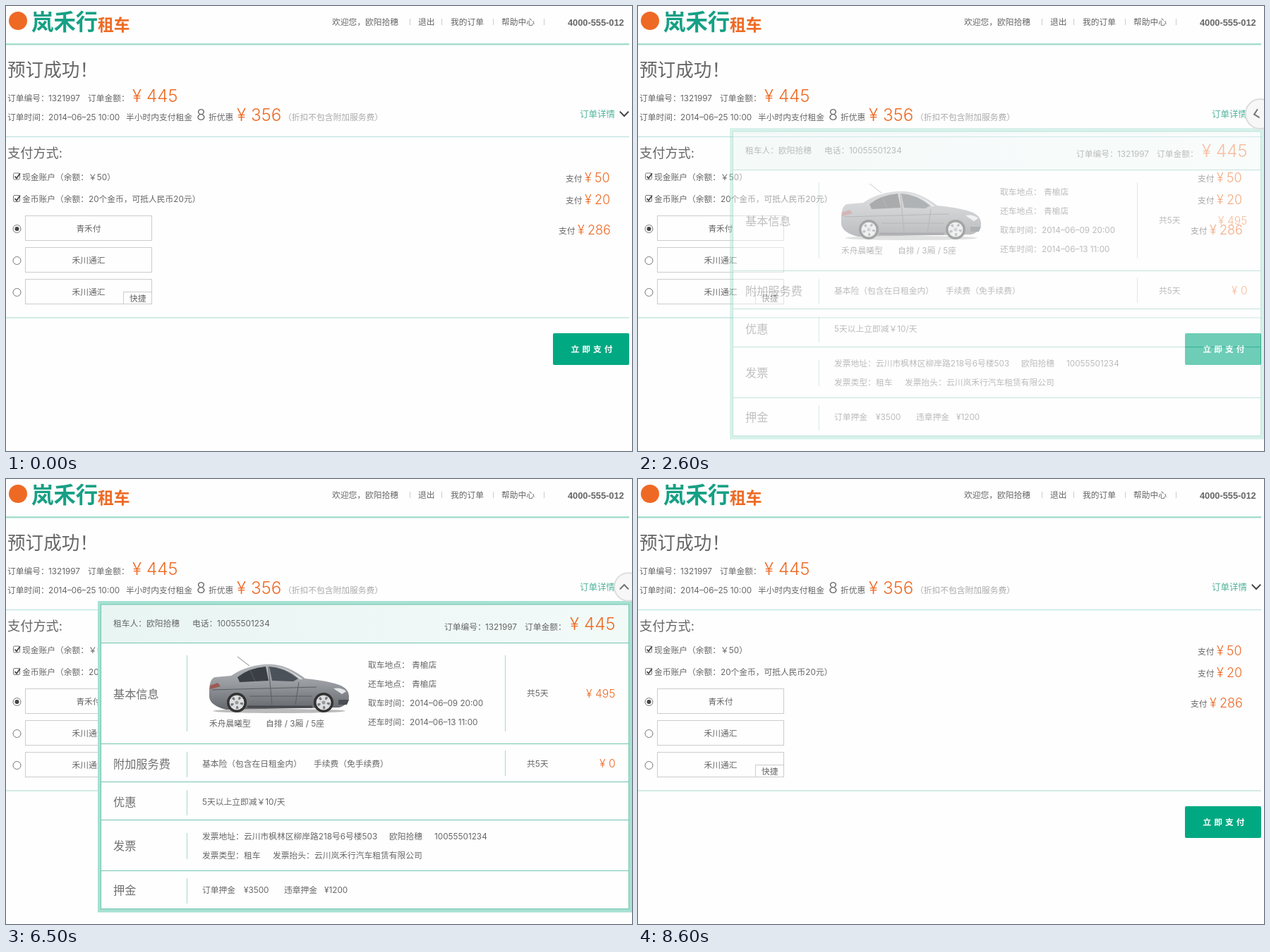
These frames come from a looping animation (887 by 631 pixels, 8620 ms). An HTML page:

```html
<!DOCTYPE html>
<html lang="zh-CN">
<head>
<meta charset="utf-8">
<title>预订成功</title>
<style>
html, body { margin: 0; width: 100%; height: 100%; overflow: hidden; background: #fefefe; }
svg { display: block; }
text { font-family: Inter, "Noto Sans CJK SC", "Noto Sans CJK", "Noto Sans CJK JP", sans-serif; white-space: pre; }
</style>
</head>
<body>
<svg id="stage" width="887" height="631" viewBox="0 0 887 631"></svg>
<script>
const LOOP = 8620, GREY = '#666', ORANGE = '#ee6a24', GREEN = '#00a982';
const USER = '欧阳拾穗', MOBILE = '10055501234', STORE = '青榆店';

// y is the visual centre of the glyphs
const text = (x, y, s, size = 11.75, fill = GREY, attrs = '') =>
  `<text x="${x}" y="${y + size * .38}" font-size="${size}" fill="${fill}" ${attrs}>${s}</text>`;
const price = (x, y, s, size, gap) =>
  text(x, y, '¥', size, ORANGE, 'font-weight="300"') +
  text(x + gap, y, s, size, ORANGE, 'font-weight="300"');
const rect = (x, y, w, h, attrs) => `<rect x="${x}" y="${y}" width="${w}" height="${h}" ${attrs}/>`;
const hline = (x, y, w, fill, h = 1) => rect(x, y, w, h, `fill="${fill}"`);
const vline = (x, y, h, fill) => rect(x, y, 1, h, `fill="${fill}"`);
const circle = (x, y, r, attrs) => `<circle cx="${x}" cy="${y}" r="${r}" ${attrs}/>`;

const checkbox = y =>
  rect(10.5, y - 4.5, 9, 9, 'rx="1.5" fill="#fff" stroke="#777"') +
  `<path d="M12.5 ${y}l2.5 2.8 5-7" fill="none" stroke="#444" stroke-width="1.7"/>`;

const option = (y, label, on) =>
  circle(15.5, y, 5.5, 'fill="#fff" stroke="#777"') +
  (on ? circle(15.5, y, 3, 'fill="#444"') : '') +
  rect(27.5, y - 18.5, 179, 35, 'fill="none" stroke="#ccc"') +
  text(117, y, label, 11.75, GREY, 'text-anchor="middle"');

const payment = (x, y, amount) => text(x, y + 1.5, '支付') + price(x + 27, y, amount, 18, 14);

const header =
  circle(17, 21, 13, `fill="${ORANGE}"`) +
  text(36, 22, '岚禾行', 31.4, '#16a085', 'font-weight="900"') +
  text(130, 26, '租车', 22.7, ORANGE, 'font-weight="900"') +
  text(462, 23, '欢迎您，' + USER) + text(584, 23, '退出') +
  text(630, 23, '我的订单') + text(702, 23, '帮助中心') +
  [572, 617, 690, 762].map(x => vline(x, 18, 9, '#ccc')).join('') +
  text(796, 23.3, '4000-555-012', 12.8, GREY,
    'font-weight="bold" style="font-family:\'Liberation Sans\',sans-serif"') +
  hline(0, 53, 883, '#a3dccd', 2.4);

const order =
  text(2, 90.5, '预订成功！', 25.6, GREY, 'font-weight="300"') +
  text(2, 131, '订单编号：') + text(60, 131, '1321997') + text(116, 131, '订单金额：') +
  price(179, 126.5, '445', 24.2, 20) +
  text(2, 158, '订单时间：') + text(60, 158, '2014–06–25 10:00') +
  text(170, 158, '半小时内支付租金') + text(270, 154.5, '8', 21, GREY, 'font-weight="300"') +
  text(287, 158, '折优惠') +
  price(327, 153.5, '356', 24.2, 20) +
  text(393, 158, '（折扣不包含附加服务费）', 11.75, '#aaa') +
  text(813, 153.5, '订单详情', 12.5, '#4fb39b') +
  hline(0, 185, 883, '#b4dedc');

const payWays =
  text(2, 208, '支付方式:', 18.2) +
  checkbox(241.5) + text(23, 243, '现金账户（余额：￥50）') +
  checkbox(273) + text(23, 274, '金币账户（余额：20个金币，可抵人民币20元）') +
  payment(793, 243, '50') + payment(793, 274, '20') + payment(783, 317.5, '286') +
  option(316, '青禾付', true) + option(361, '禾川通汇') + option(406, '禾川通汇') +
  rect(166.5, 405.5, 40, 17, 'fill="#fefefe" stroke="#ccc"') + text(175, 415, '快捷') +
  hline(0, 441.5, 883, '#a8dccb') +
  rect(775, 464, 108, 45, `rx="2" fill="${GREEN}"`) +
  text(800.5, 487, '立即支付', 11.75, '#fff', 'font-weight="bold" letter-spacing="4"');

const wheel = x =>
  circle(x, 317, 14, 'fill="#333"') + circle(x, 317, 10.5, 'fill="#dcdee0"') +
  circle(x, 317, 7, 'fill="none" stroke="#77797c" stroke-width="4" stroke-dasharray="3 5.8"') +
  circle(x, 317, 2.5, 'fill="#999"');

const car =
  `<ellipse cx="387" cy="329" rx="94" ry="3" fill="#bbb"/>
  <path d="M328 252l17 13" stroke="#888"/>
  <path d="M288 298Q289 283 296 281L319 279Q342 263 374 262.5Q398 263 424 283Q456 286 472 292Q486 297 486 309Q486 320 472 324L312 327Q288 321 288 308Z" fill="url(#paint)"/>
  <path d="M328 281Q344 268 368 266L372 286L331 288Z" fill="#3a3f45"/>
  <path d="M373 266Q394 267 414 283L407 287L377 286Z" fill="#4b5259"/>
  <path d="M382 266Q398 267 421 284L416 284Q400 269 382 266Z" fill="#d5d8da"/>
  <path d="M346 271l7 16M372 266l5 55M415 288l-5 32M292 299L440 295M345 308L434 308" fill="none" stroke="#5a5d62"/>
  <path d="M342 323H434" stroke="#44474b" stroke-width="3"/>
  <path d="M289 293l11-4 4 5-15 4Z" fill="#9d5a54"/>
  <path d="M464 297q11-2 18 4l-6 4Z" fill="#e4e7e9"/>
  <path d="M471 313h15l-3 7h-12Z" fill="#4a4d51"/>` + wheel(327) + wheel(450);

const LINE = '#74c4b0', SOFT = '#a5d9cc';
const panel =
  rect(132.5, 175.5, 752, 436.5, 'fill="#fefefe" stroke="#a6e1d2" stroke-width="5"') +
  rect(135, 178, 747.5, 54, 'fill="url(#bar)"') +
  rect(134.5, 178, 748, 431.5, `fill="none" stroke="${LINE}"`) +
  [232, 375, 429, 483, 555].map(y => hline(135, y, 747, LINE)).join('') +
  [[250, 108], [387, 36], [441, 36], [502, 37], [566, 36]].map(([y, h]) => vline(256, y, h, SOFT)).join('') +
  vline(707, 250, 108, SOFT) + vline(707, 385, 36, SOFT) +
  text(152, 205, '租车人：') + text(199, 205, USER) + text(264, 205, '电话：') + text(299, 205, MOBILE) +
  text(621, 210, '订单编号：') + text(679, 210, '1321997') + text(735, 210, '订单金额：') +
  price(799, 205, '445', 24.2, 20) +
  [['基本信息', 305], ['附加服务费', 404], ['优惠', 458], ['发票', 520], ['押金', 583]]
    .map(([s, y]) => text(152, y, s, 16.2, '#707070')).join('') +
  car +
  text(288, 347, '禾舟晨曦型') + text(368, 347, '自排 / 3厢 / 5座') +
  text(513, 264, '取车地点：') + text(575, 264, STORE) +
  text(513, 291, '还车地点：') + text(575, 291, STORE) +
  text(513, 318, '取车时间：') + text(572, 318, '2014–06–09 20:00') +
  text(513, 345, '还车时间：') + text(572, 345, '2014–06–13 11:00') +
  text(738, 304, '共5天') + price(822, 304, '495', 15.6, 13) +
  text(278, 404, '基本险（包含在日租金内）') + text(436, 404, '手续费（免手续费）') +
  text(738, 404, '共5天') + price(841, 403, '0', 15.6, 13) +
  text(278, 458, '5天以上立即减￥10/天') +
  text(278, 507, '发票地址：') + text(337, 507, '云川市枫林区柳岸路218号6号楼503') +
  text(543, 507, USER) + text(607, 507, MOBILE) +
  text(278, 534, '发票类型：') + text(337, 534, '租车') +
  text(378, 534, '发票抬头：') + text(437, 534, '云川岚禾行汽车租赁有限公司') +
  text(278, 583, '订单押金') + text(337, 583, '¥3500') +
  text(394, 583, '违章押金') + text(451, 583, '¥1200');

const $ = id => document.getElementById(id);
$('stage').innerHTML = `
  <defs>
    <linearGradient id="paint" x2="0" y2="1">
      <stop stop-color="#b4b7ba"/><stop offset=".45" stop-color="#96999e"/><stop offset="1" stop-color="#64676c"/>
    </linearGradient>
    <linearGradient id="bar"><stop stop-color="#e9f5f2"/><stop offset="1" stop-color="#f2faf8"/></linearGradient>
  </defs>
  ${header}${order}${payWays}
  <g id="panel">${panel}</g>
  <g id="halo">${circle(0, 0, 21, 'fill="#f7f7f7" stroke="#dcdcdc" stroke-width="2"')}</g>
  <path id="arrow" d="M-6.2 -3.4L0 3L6.2 -3.4" fill="none" stroke-width="2"/>`;

const ramp = (t, start, length) => {
  const u = Math.min(1, Math.max(0, (t - start) / length));
  return u * u * (3 - 2 * u);
};

function draw() {
  const t = performance.now() % LOOP;
  const open = ramp(t, 2465, 300) - ramp(t, 6595, 300);
  const hover = ramp(t, 1150, 200) - ramp(t, 3250, 200) + ramp(t, 6330, 200) - ramp(t, 7500, 200);
  const shade = 68 + 50 * hover;
  $('panel').setAttribute('opacity', open);
  $('halo').setAttribute('opacity', hover);
  $('halo').setAttribute('transform', `translate(881.8 153) scale(${hover})`);
  $('arrow').setAttribute('stroke', `rgb(${shade},${shade},${shade})`);
  $('arrow').setAttribute('transform', `translate(876 153) rotate(${180 * open})`);
  requestAnimationFrame(draw);
}
draw();
</script>
</body>
</html>
```
